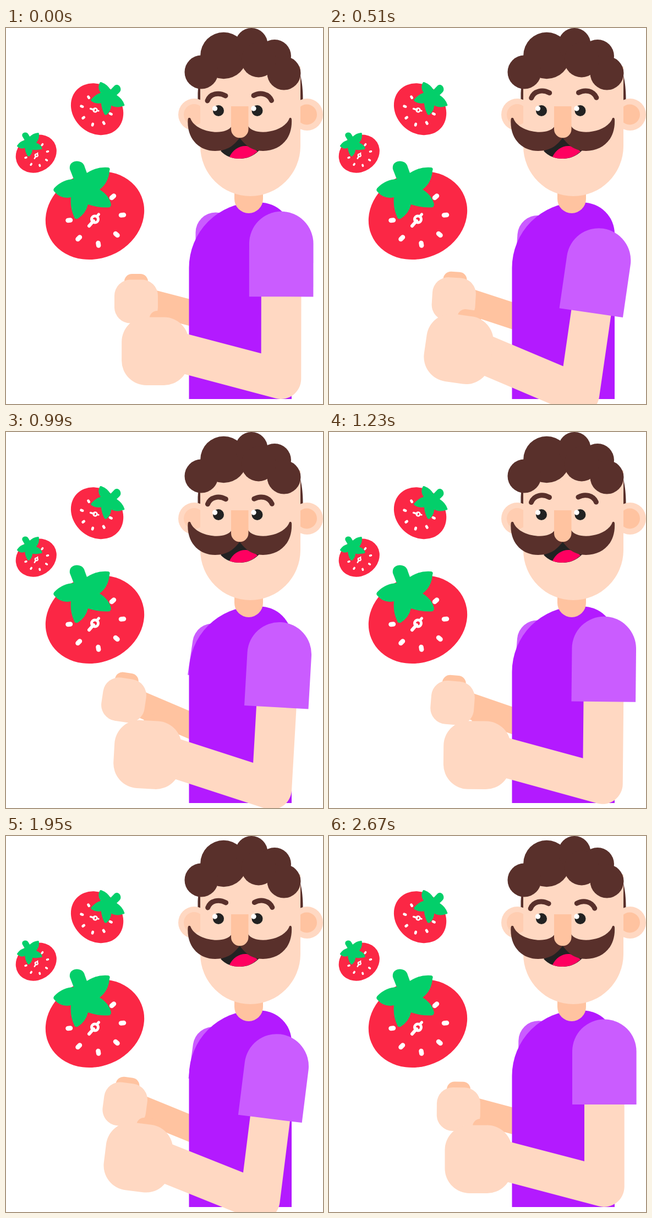
Animation of 576 by 682 pixels, one loop 2700 ms. Source, as an HTML page:

```html
<!DOCTYPE html>
<html lang="en">
<head>
<meta charset="utf-8">
<title>Strawberry juggler</title>
<style>
  html, body { margin: 0; width: 100%; height: 100%; overflow: hidden; background: #fff; }
  svg { display: block; width: 576px; height: 682px; }
  .hair { fill: #59302b; }
  .skin { fill: #ffd8c2; }
  .shade { fill: #ffc3a0; }
  .shirt { fill: #b31aff; }
  .sleeve { fill: #ca5cff; }
  .line { fill: none; stroke-linecap: round; }
</style>
</head>
<body>
<svg viewBox="0 0 576 682">
  <defs>
    <g id="berry" transform="translate(-162 -340)">
      <ellipse cx="161.5" cy="340" rx="91.5" ry="78" fill="#fb2745" transform="rotate(-22.4 161.5 340)"/>
      <path fill="#03cf6a" d="M116 256C113 238 140 237 143 252L147 263Q165 251 186 253Q190 254 188 259C187 273 181 285 170 293Q187 303 191 320Q191 326 184 325.500Q167 326 149 320Q145 337 130 346Q125 347 124 343Q116 326 118 307Q100 311 88 297Q84 293 89 289Q103 275 123 274Z"/>
      <g class="line" stroke="#fff">
        <path stroke-width="8.5" d="M112.500 349l4.500-.5M192 308l4-3.500M209 339.500l5-.5M199 373l3.500 3M167.500 390l.7 4.500M130.500 383l3.500-3.500"/>
        <path stroke-width="6" d="M151 359l8-9"/>
        <path stroke-width="5" d="M165 342l3.500-4"/>
        <circle cx="161.5" cy="347" r="6" stroke-width="5"/>
      </g>
    </g>
  </defs>

  <use href="#berry" transform="translate(165.700 147.500) rotate(65) scale(.557)"/>
  <use href="#berry" transform="translate(55 228) rotate(-10) scale(.422)"/>
  <use href="#berry" transform="translate(162 340)"/>

  <g id="backArm">
    <path class="line" stroke="#ffc3a0" stroke-width="47" d="M420 538.300L236 490.700"/>
    <path class="sleeve" d="M344.500 433.500V371a36.500 36.500 0 0 1 73 0V433.500Z"/>
    <rect class="shade" x="215" y="446" width="43" height="30" rx="14"/>
    <rect class="skin" x="197" y="456.500" width="79" height="79" rx="29"/>
  </g>

  <path class="shirt" d="M332.500 673V435A118.500 118.500 0 0 1 451 316.500H461A58 57 0 0 1 519 373.500V673Z"/>
  <path class="shade" d="M415 280V310a26 26 0 0 0 52 0V280Z"/>

  <path class="hair" d="M348.500 135V118Q349 100 355 80H533Q540 100 539.500 135Z"/>
  <circle class="skin" cx="342" cy="157" r="29"/>
  <circle class="skin" cx="547" cy="157" r="29"/>
  <circle fill="#ffcdb1" cx="342" cy="157" r="19"/>
  <circle class="shade" cx="546.500" cy="157" r="18.500"/>
  <path class="skin" d="M353 70H535V214a91 91 0 0 1-182 0Z"/>
  <g class="hair">
    <circle cx="395.500" cy="50" r="42.300"/>
    <circle cx="446" cy="29.500" r="29.500"/>
    <circle cx="355" cy="80" r="30.500"/>
    <circle cx="488" cy="51" r="30"/>
    <circle cx="505" cy="82" r="30.500"/>
    <circle cx="459" cy="58" r="31.500"/>
  </g>

  <path fill="#222" d="M424 196L460 222Q445 237 425 237Q403 237 390 223Z"/>
  <path fill="#ff0060" d="M406 234C412 220 425 213 437 214Q448 215 457 224Q443 237 425 237Q414 237 406 234Z"/>
  <path class="hair" d="M330.500 165.500Q331 161.500 335 163.500C344 190 399 197 410 178H440C451 197 506 190 515 163.500Q518.500 161.500 519 165.500C521 202 497 223 467 223C446 223 434 212 424.700 199C415 212 403 223 380 223C352 223 328 202 330.500 165.500Z"/>
  <path class="shade" d="M409 142H440.500V183.500a15.750 15.750 0 0 1-31.500 0Z"/>
  <g fill="#222"><circle cx="386" cy="150" r="10"/><circle cx="456.500" cy="150" r="10"/></g>
  <g fill="#fff"><circle cx="379.500" cy="146" r="4.700"/><circle cx="450" cy="146" r="4.700"/></g>
  <g class="line" stroke="#59302b" stroke-width="9">
    <path id="leftBrow" d="M366 132C371 119 386 116 399 123"/>
    <path id="rightBrow" d="M450 122.500C462 116 477 119 482.500 131.500"/>
  </g>

  <g id="frontArm">
    <path class="skin" d="M464 475V590L320 552.500V626.500L490.700 671.500A36.700 36.700 0 0 0 536.700 636V475Z"/>
    <rect class="shade" x="261" y="513" width="43" height="30" rx="14"/>
    <rect class="skin" x="210.500" y="524.500" width="122" height="123.500" rx="45"/>
    <path class="sleeve" d="M442 487V390.800a58.300 58.300 0 0 1 116.600 0V487Z"/>
  </g>
</svg>
<script>
  const LOOP = 2700, SWING = 1200;
  const $ = id => document.getElementById(id);
  const clamp = (v, max) => Math.min(Math.max(v, 0), max);
  // Linear there-and-back wave, 0..1..0 over each period
  const wave = (t, period) => 1 - Math.abs((t % period) / period * 2 - 1);
  const move = (id, transform) => $(id).setAttribute("transform", transform);

  function draw() {
    const t = performance.now() % LOOP;
    const swing = delay => wave(clamp(t + 4 - delay, 2 * SWING), SWING);
    const lift = wave(t, 900);
    move("frontArm", `rotate(${9.6 * swing(0)} 282 335)`);
    move("backArm", `rotate(${10.1 * swing(300)} 291 340)`);
    move("leftBrow", `translate(${2 * lift} ${-6 * lift})`);
    move("rightBrow", `translate(${4 * lift} ${-6 * lift})`);
    requestAnimationFrame(draw);
  }
  draw();
</script>
</body>
</html>
```
